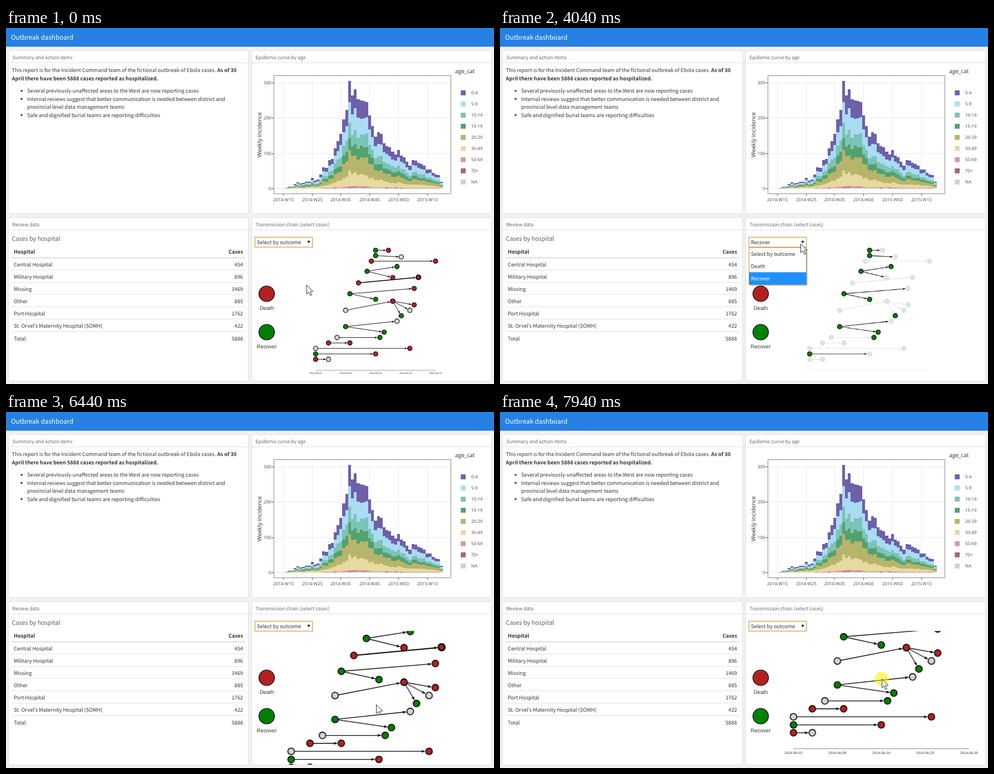
Recreate the animation shown at these times as an HTML page. Size 877x639 px, loop 8000 ms.

```html
<!DOCTYPE html>
<html lang="en">
<head>
<meta charset="utf-8">
<title>Outbreak dashboard</title>
<style>
html, body { margin: 0; width: 100%; height: 100%; overflow: hidden; background: #f1f1f1; }
svg { display: block; width: 877px; height: 639px; text-rendering: geometricPrecision; }
text { font: 9.25px "Noto Sans CJK JP", "Noto Sans CJK SC", "Noto Sans CJK", "Noto Sans", sans-serif; fill: #333; white-space: pre; }
.b { font-weight: 700; }
.end { text-anchor: end; }
.mid { text-anchor: middle; }
.brand { font-size: 11.67px; fill: #fff; }
.cap { font-size: 8.63px; fill: #666; }
.h { font-size: 10.8px; font-weight: 300; fill: #5a5a5a; }
.plot text { font: 7.9px "Open Sans", "Noto Sans", sans-serif; fill: #444; }
.plot .big { font-size: 10.15px; fill: #2a2a2a; }
.net text { font: 4.3px "Liberation Sans", Arial, sans-serif; }
.net .key { font-size: 9.65px; fill: #343434; }
.opt text { fill: #fff; }

.a { animation: 8s step-end infinite; }
.picked { animation-name: picked; }
.unpicked { animation-name: unpicked; }
.list { animation-name: list; }
.opt0 { animation-name: opt0; }
.opt1 { animation-name: opt1; }
.opt2 { animation-name: opt2; }
.tap { animation-name: tap; }
.view { animation-name: view; transform-origin: 651.5px 502px; }
.cursor { animation-name: cursor; }

@keyframes picked { 0%, 57.25%, 100% { opacity: 0 } 31% { opacity: 1 } }
@keyframes unpicked { 0%, 57.25%, 100% { opacity: 1 } 31% { opacity: 0 } }
@keyframes list { 0%, 31%, 57.25%, 100% { opacity: 0 } 12.625%, 49.25% { opacity: 1 } }
@keyframes opt0 { 0%, 52.2%, 100% { opacity: 1 } 21.2% { opacity: 0 } }
@keyframes opt1 { 0%, 24.1%, 100% { opacity: 0 } 21.2% { opacity: 1 } }
@keyframes opt2 { 0%, 52.2%, 100% { opacity: 0 } 24.1% { opacity: 1 } }
@keyframes tap {
  0%, 13.375%, 31%, 50.25%, 57.25% { opacity: 0 }
  11.75%, 28.875%, 49.25%, 55.375%, 82.625%, 100% { opacity: .55 }
  54.625% { opacity: .3 }
}
@keyframes view {
  0% { transform: translate(0, 0) scale(1) }
  67.875% { transform: translate(0, 0) scale(1.1) }
  71.875% { transform: translate(0, 0) scale(1.21) }
  73.875% { transform: translate(0, 0) scale(1.331) }
  75.875% { transform: translate(0, 0) scale(1.464) }
  82.625% { transform: translate(0, 0) scale(1.464); animation-timing-function: steps(5, start) }
  87.46% { transform: translate(-9px, -84px) scale(1.464) }
  94.125% { transform: translate(-9px, -84px) scale(1.464); animation-timing-function: steps(3, start) }
  97.2% { transform: translate(21px, -74px) scale(1.464); animation-timing-function: steps(3, start) }
  100% { transform: translate(15px, -62px) scale(1.464) }
}
@keyframes cursor {
  0% { transform: translate(540px, 461px) }
  5% { transform: translate(540px, 461px); animation-timing-function: steps(6, start) }
  10.4% { transform: translate(543px, 381px) }
  17.25% { transform: translate(543px, 381px); animation-timing-function: steps(8, start) }
  25.1% { transform: translate(514px, 444px) }
  44.5% { transform: translate(514px, 444px); animation-timing-function: steps(5, start) }
  49.5% { transform: translate(540px, 387px) }
  51.25% { transform: translate(540px, 387px); animation-timing-function: steps(3, start) }
  54.06% { transform: translate(523px, 405px) }
  59.75% { transform: translate(523px, 405px); animation-timing-function: steps(7, start) }
  65.875% { transform: translate(651px, 502.5px) }
  76.75% { transform: translate(651px, 502.5px); animation-timing-function: steps(6, start) }
  82.6% { transform: translate(672px, 536px) }
  82.625% { transform: translate(672px, 536px); animation-timing-function: steps(5, start) }
  87.46% { transform: translate(663px, 452px) }
  94.125% { transform: translate(663px, 452px); animation-timing-function: steps(3, start) }
  97.2% { transform: translate(692px, 463px); animation-timing-function: steps(3, start) }
  100% { transform: translate(686px, 479px) }
}
</style>
</head>
<body>
<svg id="stage" viewBox="0 0 877 639"></svg>
<script>
const text = (x, y, s, c = '', extra = '') => `<text x="${x}" y="${y}" class="${c}" ${extra}>${s}</text>`;
const rect = (x, y, w, h, fill, extra = '') => `<rect x="${x}" y="${y}" width="${w}" height="${h}" fill="${fill}" ${extra}/>`;
const line = (x1, y1, x2, y2, stroke, w = 1) => `<path d="M${x1} ${y1}L${x2} ${y2}" stroke="${stroke}" stroke-width="${w}"/>`;
const circle = (x, y, r, fill, extra = '') => `<circle cx="${x}" cy="${y}" r="${r}" fill="${fill}" ${extra}/>`;
const group = (c, s, extra = '') => `<g class="${c}" ${extra}>${s}</g>`;

const panel = (x, y, w, title) =>
  rect(x + .5, y + .5, w, 293, '#fff', 'stroke="#e0e0e0"') +
  line(x, y + 22.5, x + w, y + 22.5, '#e2e2e2') +
  text(x + 7.5, y + 15.8, title, 'cap');

function summary() {
  const items = [
    'Several previously-unaffected areas to the West are now reporting cases',
    'Internal reviews suggest that better communication is needed between district and',
    'provincial level data management teams',
    'Safe and dignified burial teams are reporting difficulties'
  ];
  return text(10.5, 79.3, 'This report is for the Incident Command team of the fictional outbreak of Ebola cases. <tspan class="b">As of 30</tspan>') +
    text(10.5, 93.8, 'April there have been 5888 cases reported as hospitalized.', 'b') +
    items.map((s, i) => text(38, 116.2 + i * 14.5, s) +
      (i === 2 ? '' : circle(28, 112.8 + i * 14.5, 1.7, '#333'))).join('');
}

function table() {
  const rows = [['Central Hospital', 454], ['Military Hospital', 896], ['Missing', 1469], ['Other', 885],
    ['Port Hospital', 1762], ['St. Orvel’s Maternity Hospital (SOMH)', 422], ['Total', 5888]];
  let s = text(10.5, 381.5, 'Cases by hospital', 'h') +
    text(14, 405, 'Hospital', 'b') + text(426, 405, 'Cases', 'b end') +
    line(10, 412.5, 430, 412.5, '#d4d4d4', 1.4);
  rows.forEach(([name, n], i) => {
    const y = 427.7 + i * 22.15;
    s += text(14, y, name) + text(426, y, n, 'end');
    if (i < 6) s += line(10, Math.round(y + 6) + .5, 430, Math.round(y + 6) + .5, '#e2e2e2');
  });
  return s;
}

function chart() {
  const ages = ['0-4', '5-9', '10-14', '15-19', '20-29', '30-49', '50-69', '70+', 'NA'];
  const tones = ['#6d60a9', '#a9dbf3', '#7cc4b5', '#55a06f', '#b6b56b', '#e6daa0', '#dd969d', '#a4637d', '#d0d0d0'];
  const shares = [.19, .215, .14, .115, .185, .13, .014, .002, .007];
  const heights = [0, 1, 3, 3, 8, 11, 9, 10, 12, 12, 19, 14, 16, 25, 38, 37, 51, 53, 72, 85, 98, 124, 141, 193,
    167, 178, 160, 158, 157, 155, 131, 112, 93, 101, 98, 81, 76, 74, 66, 61, 69, 59, 56, 48, 41, 51, 50, 46,
    44, 41, 34, 34, 28, 25, 24, 12];
  const step = 5.17, x0 = 498.5, y0 = 288;
  let seed = 11;
  const rand = () => (seed = seed * 16807 % 2147483647) / 2147483647;
  let s = '';
  for (let i = 0; i < 4; i++) {
    const y = Math.round(y0 - i * 63.3) + .5;
    s += line(481, y, 799, y, '#ebebeb') + line(477, y, 481, y, '#555') + text(476.5, y + 2.8, i * 100, 'end');
  }
  ['2014-W15', '2014-W25', '2014-W35', '2014-W45', '2015-W03', '2015-W13'].forEach((week, i) => {
    const x = Math.round(x0 + i * step * 10 - .5) + .5;
    s += line(x, 86, x, 297, '#ebebeb') + line(x, 298, x, 301, '#555') + text(x, 311, week, 'mid');
  });
  heights.forEach((h, k) => {
    const parts = shares.map(p => p * (.85 + .3 * rand()));
    const sum = parts.reduce((a, b) => a + b);
    let y = y0 - h;
    parts.forEach((p, i) => {
      const part = p / sum * h;
      s += rect((x0 + (k - .5) * step).toFixed(2), y.toFixed(2), step, part.toFixed(2), tones[i], 'shape-rendering="crispEdges"');
      y += part;
    });
  });
  s += rect(481.5, 85.5, 318, 212, 'none', 'stroke="#8a8a8a"');
  s += text(0, 0, 'Weekly incidence', 'big mid', 'transform="translate(458.5 191.5) rotate(-90)"');
  s += text(807, 81, 'age_cat', 'big');
  ages.forEach((a, i) => s += rect(817.3, 112 + i * 20, 8.8, 8.8, tones[i]) + text(836, 119.2 + i * 20, a));
  return group('plot', s);
}

// Each chain: a root, then the nodes it leads to. Node: outcome, day, height.
const chains = [
  ['G 14 399', 'R 17 399'], ['G 14 408.5', 'N 20 411'], ['R 13 418.5', 'R 28 418.5'],
  ['G 12 436.7', 'G 19 428.2', 'R 18 448'], ['R 10 457.5', 'R 24 447.5'],
  ['G 8 477', 'R 23 467.5', 'G 14 487'], ['N 7 506.7', 'R 18 490.3'],
  ['R 18 490.3', 'R 23 497', 'N 22 506.7', 'G 20 516.5'],
  ['G 7 536', 'N 19 526.2', 'G 16 546'], ['N 5 555.6', 'G 15 555.6'], ['R 3 565.3', 'R 8 565.3'],
  ['N 0 575.1', 'R 22 575.1'], ['G 0 585', 'R 14 585'], ['R 0 594.7', 'N 3 594.7']
].map(chain => chain.map(n => {
  const [kind, day, y] = n.split(' ');
  return { kind, x: dayX(+day), y: +y, twin: day === '24' };
}));
const fills = { R: '#b22222', G: '#008000', N: '#d3d3d3' };

function dayX(day) { return 556.5 + day * 7.695; }

function arrow(a, b, color) {
  const d = Math.hypot(b.x - a.x, b.y - a.y), ux = (b.x - a.x) / d, uy = (b.y - a.y) / d;
  const at = (back, side) => `${(b.x - ux * back - uy * side).toFixed(2)} ${(b.y - uy * back + ux * side).toFixed(2)}`;
  return `<path d="M${a.x} ${a.y}L${at(8, 0)}" stroke="${color}" stroke-width="${b.twin ? 1.4 : .9}"/>` +
    `<path d="M${at(4.4, 0)}L${at(9.4, 1.7)}L${at(8.6, 0)}L${at(9.4, -1.7)}Z" fill="${color}"/>`;
}

function network(onlyGreen) {
  const dim = n => onlyGreen && n.kind !== 'G';
  let edges = '', dots = ['', ''];
  for (const [root, ...kids] of chains) {
    for (const kid of kids) edges += arrow(root, kid, dim(root) ? '#e2e2e2' : '#000');
    for (const n of [root, ...kids])
      dots[dim(n) ? 0 : 1] += circle(n.x, n.y, 4.05, dim(n) ? '#e3e3e3' : fills[n.kind],
        `stroke="${dim(n) ? '#d9d9d9' : '#000'}" stroke-width="${n.twin && !onlyGreen ? 2 : 1.1}"`);
  }
  let axis = line(dayX(0), 614.3, dayX(28), 614.3, onlyGreen ? '#eee' : '#888', .8);
  if (!onlyGreen)
    ['02', '09', '16', '23', '30'].forEach((d, i) => axis += text(dayX(i * 7), 620.8, '2014-06-' + d, 'mid'));
  return axis + edges + dots.join('');
}

function picker() {
  const names = ['Select by outcome', 'Death', 'Recover'];
  const option = (s, i) => text(451, 409 + i * 22.2, s);
  return rect(447.4, 375.5, 103.4, 17.8, '#fff', 'stroke="#d3a04a" stroke-width="1.3"') +
    group('a unpicked', text(451, 388, names[0])) + group('a picked', text(451, 388, names[2])) +
    '<path d="M541.3 382h5.4l-2.7 4.8z" fill="#222"/>' +
    group('a list',
      rect(449.5, 396, 103, 66.5, '#000', 'opacity=".28"') +
      rect(447.5, 394, 103, 66.5, '#fff', 'stroke="#b98b45"') + names.map(option).join('') +
      names.map((s, i) => group('a opt opt' + i, rect(448, 394 + i * 22.2, 102.5, 22, '#1e90ff') + option(s, i))).join(''));
}

const legend = [['Death', 'R', 477], ['Recover', 'G', 546]].map(([s, kind, y]) =>
  circle(468.5, y, 14, fills[kind], 'stroke="#000" stroke-width="1.2"') + text(468.5, y + 29, s, 'key mid')).join('');

const pointer = group('a cursor',
  circle(0, 0, 12.8, '#fcf000', 'class="a tap"') +
  '<path d="M.5 .3V16.4L4.2 13L6.9 19.2L9.4 18.1L6.7 12.1L11.8 11.9Z" fill="#fff" stroke="#333" stroke-width="1"/>');

document.getElementById('stage').innerHTML =
  '<clipPath id="frame"><rect x="489.5" y="393" width="382.5" height="240"/></clipPath>' +
  rect(0, 0, 877, 639, '#f1f1f1') + rect(0, 0, 877, 33.6, '#2780e3') +
  text(9, 21, 'Outbreak dashboard', 'brand') +
  panel(4, 40, 431, 'Summary and action items') + panel(441, 40, 431, 'Epidemic curve by age') +
  panel(4, 340, 431, 'Review data') + panel(441, 340, 431, 'Transmission chain (select cases)') +
  summary() + table() + chart() +
  group('net', group('a view', group('a unpicked', network(false)) + group('a picked', network(true))), 'clip-path="url(#frame)"') +
  group('net', legend) + picker() + pointer;
</script>
</body>
</html>
```
